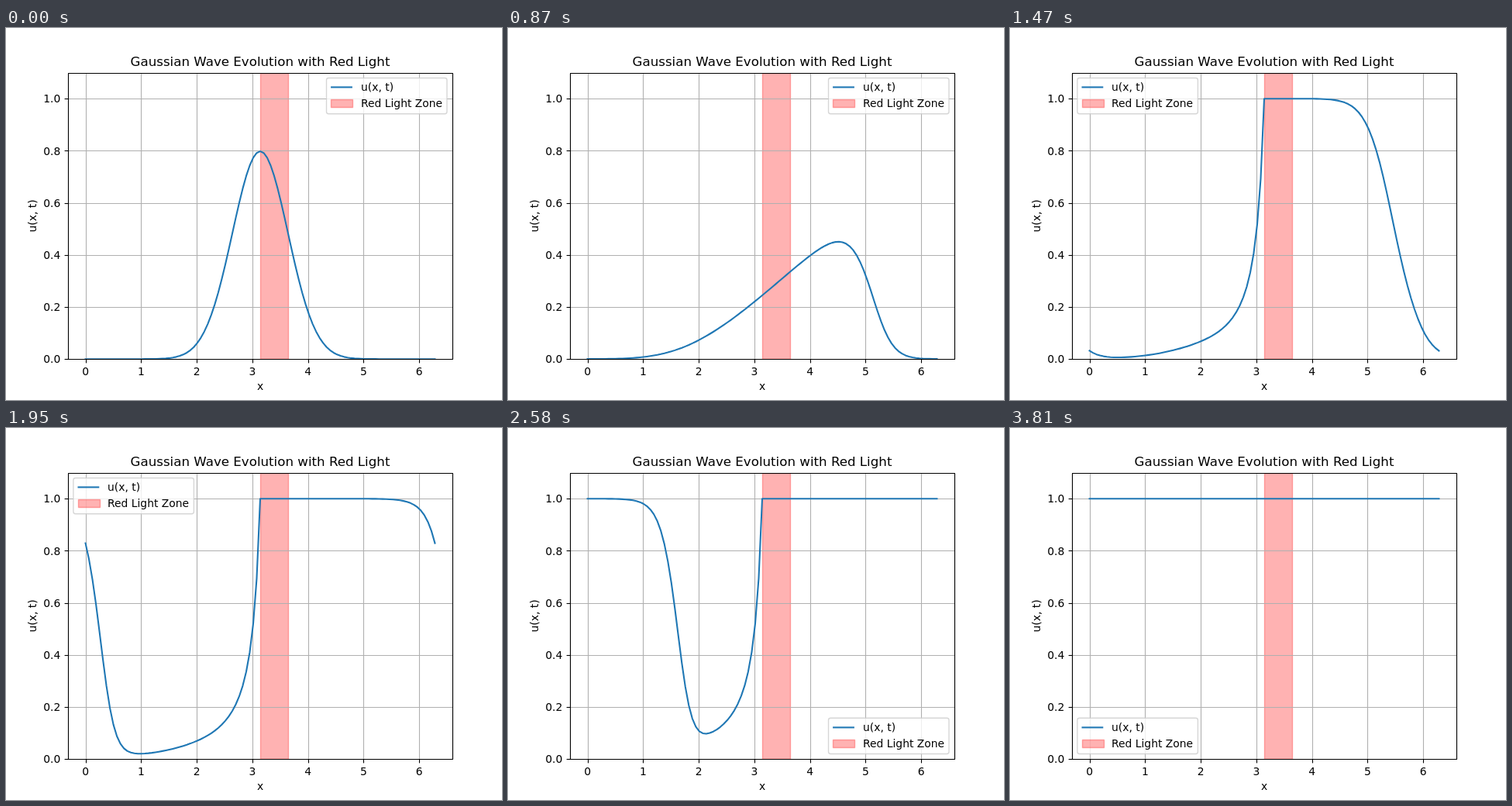
An HTML page with a canvas for the animation above (3.93 s loop, 640 by 480 pixels).

```html
<!DOCTYPE html>
<html lang="en">
<head>
<meta charset="utf-8">
<title>Gaussian Wave Evolution with Red Light</title>
<style>
  html, body { margin: 0; width: 100%; height: 100%; overflow: hidden; background: #fff; }
  canvas { display: block; }
</style>
</head>
<body>
<canvas id="stage" width="640" height="480"></canvas>
<script>
const ctx = document.getElementById('stage').getContext('2d');
const FONT = '"DejaVu Sans", sans-serif';
const PT = 100 / 72;
const BLUE = '#1f77b4', PINK = 'rgba(255, 0, 0, 0.3)';
const LOOP = 3930, FRAME_MS = 30, FRAMES = LOOP / FRAME_MS;

// Plot geometry
const LEFT = 80, RIGHT = 576, TOP = 57.6, BOTTOM = 427.2;
const px = x => 102.545 + x * 450.91 / (2 * Math.PI);
const py = u => BOTTOM - u * 336;
const snap = v => Math.floor(v + 0.5) + 0.5;

// Viscous Burgers equation: conservative upwind flux, periodic domain
const N = 100, DX = 2 * Math.PI / N, NU = 0.05;
const STEPS = 40, DT = 0.127 / STEPS;
const RED_FROM = 50, RED_TO = 57, RED_TIME = 3.87;

function simulate() {
  let u = Array.from({ length: N }, (_, i) => {
    const z = (i * DX - Math.PI) / 0.5;
    return Math.exp(-z * z / 2) / (0.5 * Math.sqrt(2 * Math.PI));
  });
  const states = [u];
  for (let step = 1; states.length < FRAMES; step++) {
    const next = u.map((v, i) => {
      const l = u[(i + N - 1) % N], r = u[(i + 1) % N];
      return v - DT / DX * (v * v - l * l) / 2 + NU * DT / DX ** 2 * (r - 2 * v + l);
    });
    if (step * DT >= RED_TIME) next.fill(1, RED_FROM, RED_TO + 1);
    u = next;
    if (step % STEPS === 0) states.push(u);
  }
  return states.map(s => [...s, s[0]].map((v, i) => [px(i * DX), py(v)]));
}

const curves = simulate();

function line(points, color, width) {
  ctx.beginPath();
  points.forEach(([x, y]) => ctx.lineTo(x, y));
  ctx.strokeStyle = color;
  ctx.lineWidth = width * PT;
  ctx.stroke();
}

function text(str, x, y, align = 'center', size = 10) {
  ctx.font = `${size * PT}px ${FONT}`;
  ctx.textAlign = align;
  ctx.fillStyle = '#000';
  ctx.fillText(str, x, y);
}

function pinkBox(x, y, w, h) {
  ctx.fillStyle = ctx.strokeStyle = PINK;
  ctx.lineWidth = PT;
  ctx.fillRect(x, y, w, h);
  ctx.strokeRect(x, y, w, h);
}

// Corners in order of preference; the legend takes the first one free of the curve
const BOX_W = 155.5, BOX_H = 46.3;
const CORNERS = [[413.5, 64.5], [86.9, 64.5], [86.9, 374.2], [413.5, 374.2]];

function legendCorner(curve) {
  const hits = ([bx, by]) => curve.some(([x, y], i) => {
    const [qx, qy] = curve[Math.max(0, i - 1)];
    return [[x, y], [(x + qx) / 2, (y + qy) / 2]].some(([a, b]) =>
      a > bx && a < bx + BOX_W && b > by && b < by + BOX_H);
  });
  return CORNERS.find(c => !hits(c)) || CORNERS[3];
}

function drawLegend([x, y]) {
  ctx.beginPath();
  ctx.roundRect(x, y, BOX_W, BOX_H, 2.8);
  ctx.fillStyle = 'rgba(255, 255, 255, 0.8)';
  ctx.fill();
  ctx.strokeStyle = 'rgba(204, 204, 204, 0.8)';
  ctx.lineWidth = PT;
  ctx.stroke();
  const rowY = Math.round(y + 0.4);
  const hx = x + 5.6, tx = Math.round(x + 44.5);
  line([[hx, rowY + 11.4], [hx + 27.8, rowY + 11.4]], BLUE, 1.5);
  pinkBox(snap(hx), rowY + 27.5, 28, 10);
  text('u(x, t)', tx, rowY + 16, 'left');
  text('Red Light Zone', tx, rowY + 37, 'left');
}

function draw(curve) {
  ctx.fillStyle = '#fff';
  ctx.fillRect(0, 0, 640, 480);
  ctx.lineJoin = 'round';
  ctx.lineCap = 'butt';
  const bottom = snap(BOTTOM), top = snap(TOP);

  ctx.save();
  ctx.beginPath();
  ctx.rect(LEFT, 58, RIGHT - LEFT, 369.5);
  ctx.clip();
  const zone = snap(px(Math.PI));
  pinkBox(zone, top, snap(px(Math.PI + 0.5)) - zone, bottom - top);
  for (let i = 0; i <= 6; i++) {
    const x = snap(px(i)), y = snap(py(i / 5));
    line([[x, TOP], [x, BOTTOM]], '#b0b0b0', 0.8);
    if (i < 6) line([[LEFT, y], [RIGHT, y]], '#b0b0b0', 0.8);
  }
  ctx.lineCap = 'square';
  line(curve, BLUE, 1.5);
  ctx.restore();

  for (let i = 0; i <= 6; i++) {
    const x = snap(px(i)), y = snap(py(i / 5));
    line([[x, bottom], [x, bottom + 4.9]], '#000', 0.8);
    text(i, px(i), 448);
    if (i < 6) {
      line([[LEFT + 0.5, y], [LEFT - 4.4, y]], '#000', 0.8);
      text((i / 5).toFixed(1), 70.3, Math.round(py(i / 5) + 5.2), 'right');
    }
  }
  ctx.strokeStyle = '#000';
  ctx.lineWidth = 0.8 * PT;
  ctx.strokeRect(LEFT + 0.5, top, RIGHT - LEFT, bottom - top);

  text('Gaussian Wave Evolution with Red Light', 328, 49, 'center', 12);
  text('x', 328, 467);
  ctx.save();
  ctx.translate(39, 242.4);
  ctx.rotate(-Math.PI / 2);
  text('u(x, t)', 0, 0);
  ctx.restore();

  drawLegend(legendCorner(curve));
}

const start = performance.now();
function tick() {
  const time = (performance.now() - start) % LOOP;
  draw(curves[Math.floor(time / FRAME_MS)]);
  requestAnimationFrame(tick);
}
tick();
</script>
</body>
</html>
```
